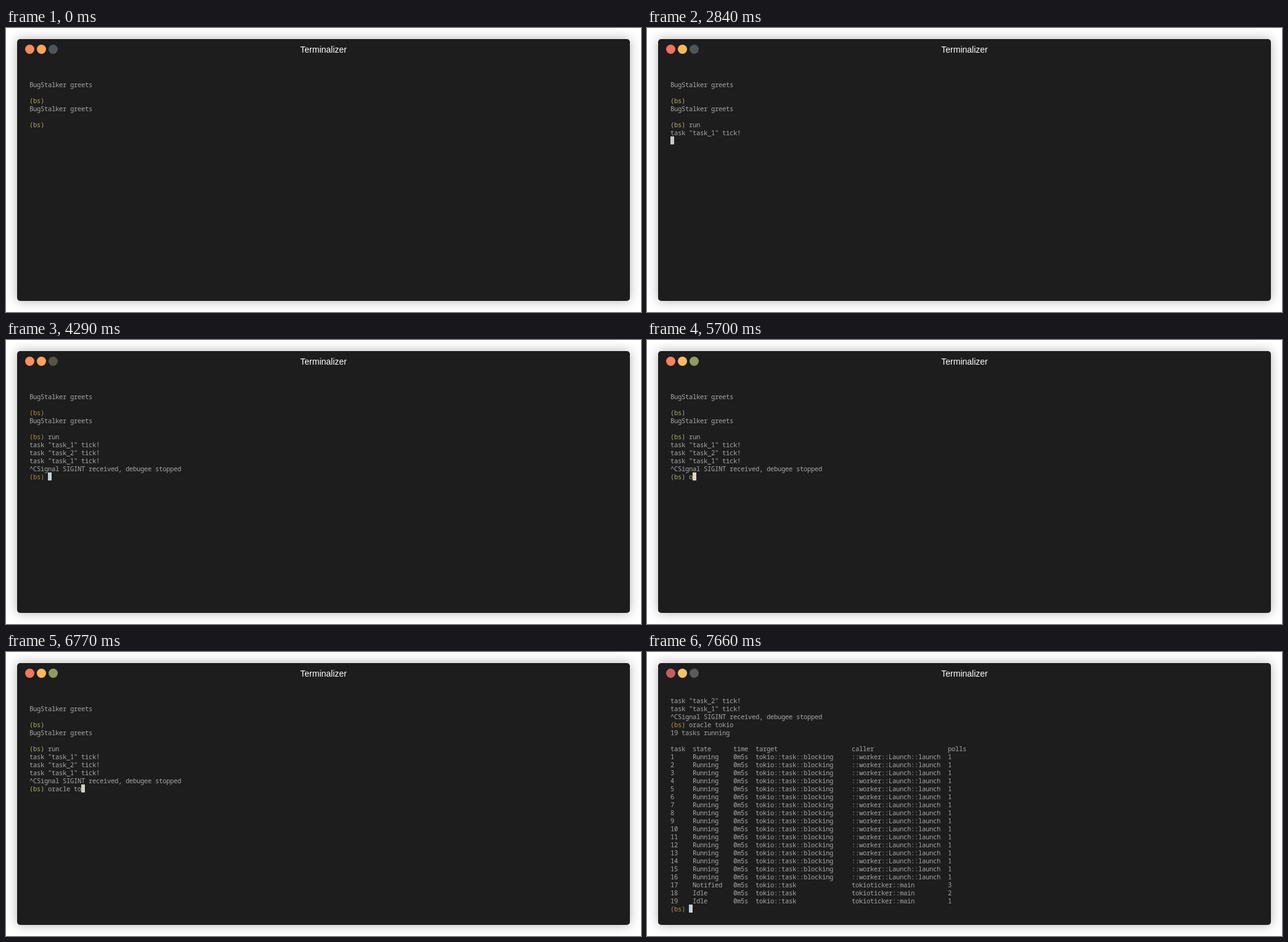
Write an HTML page that moves like this. It is 1030 px wide and 461 px high and loops after 8000 ms.

```html
<!DOCTYPE html>
<html lang="en">
<head>
<meta charset="utf-8">
<title>Terminal session</title>
<style>
  html, body { margin: 0; width: 100%; height: 100%; overflow: hidden; background: #fff; }
  #win {
    position: absolute; left: 18px; top: 18px; width: 994px; height: 425px;
    border-radius: 5px; background: #1d1d1d; box-shadow: 0 0 18px #b3b3b3;
  }
  .dot { position: absolute; top: 9px; width: 15px; height: 15px; border-radius: 50%; }
  .dot:nth-child(1) { left: 13px; background: var(--close); }
  .dot:nth-child(2) { left: 32px; background: var(--min); }
  .dot:nth-child(3) { left: 51px; background: var(--max); }
  #title {
    position: absolute; left: 0; right: 0; top: 9px; text-align: center; color: #fff;
    font: 14px/16px "Liberation Sans", Arial, sans-serif;
  }
  #screen {
    position: absolute; left: 20px; top: 55px; margin: 0; color: #a8a8a8;
    font: 10.5px/13px "Noto Sans Mono", "DejaVu Sans Mono", monospace;
    letter-spacing: -.3px; font-variant-ligatures: none; white-space: pre;
  }
  #screen b { font-weight: normal; color: var(--prompt); }
  #cursor { position: absolute; width: 6px; height: 13px; background: var(--cursor); }
</style>
</head>
<body>
<div id="win">
  <i class="dot"></i><i class="dot"></i><i class="dot"></i>
  <div id="title">Terminalizer</div>
  <pre id="screen"></pre>
  <div id="cursor"></div>
</div>
<script>
const LOOP = 8000, CELL_W = 6, CELL_H = 13, LEFT = 20, TOP = 54;
const PROMPT = '(bs) ';
const win = document.getElementById('win');
const screen = document.getElementById('screen');
const cursor = document.getElementById('cursor');

const tick = n => `task "task_${n}" tick!`;
const greeting = ['', 'BugStalker greets', '', PROMPT, 'BugStalker greets', ''];
const signal = '^CSignal SIGINT received, debugee stopped';
const ran = [...greeting, PROMPT + 'run'];
const ticked = [...ran, tick(1), tick(2), tick(1)];
const stopped = [...ticked, signal];

const row = (id, state, time, target, caller, polls) =>
  String(id).padEnd(6) + state.padEnd(11) + time.padEnd(6) +
  target.padEnd(26) + caller.padEnd(26) + polls;
const blocking = id => row(id, 'Running', '0m5s', 'tokio::task::blocking', '::worker::Launch::launch', 1);
const ticker = (id, state, polls) => row(id, state, '0m5s', 'tokio::task', 'tokioticker::main', polls);

const report = [
  tick(2), tick(1), signal, PROMPT + 'oracle tokio', '19 tasks running', '',
  row('task', 'state', 'time', 'target', 'caller', 'polls'),
  ...Array.from({ length: 16 }, (_, i) => blocking(i + 1)),
  ticker(17, 'Notified', 3), ticker(18, 'Idle', 2), ticker(19, 'Idle', 1),
  PROMPT
];

const steps = [];
const add = (at, lines) => steps.push({ at, lines });
const type = (base, keys) => keys.forEach(([at, text]) => add(at, [...base, PROMPT + text]));

type(greeting, [[0, ''], [1090, 'r'], [1185, 'ru'], [1280, 'run']]);
add(1680, [...ran, '']);
add(2840, [...ran, tick(1), '']);
add(3840, [...ticked, '']);
type(stopped, [
  [4290, ''], [5700, 'o'], [5820, 'or'], [5920, 'orac'], [6140, 'oracle'],
  [6510, 'oracle '], [6650, 'oracle t'], [6770, 'oracle to'],
  [7000, 'oracle tok'], [7180, 'oracle toki'], [7360, 'oracle tokio']
]);
add(7660, report);

const tones = ['close', 'min', 'max', 'prompt', 'cursor'];
const palettes = [
  [0, '#f68b5c', '#ffa558', '#4d565c', '#a9a860', '#c8c8c8'],
  [2840, '#f2715f', '#f8b858', '#4b555b', '#b3b36a', '#c8c8c8'],
  [4290, '#ff9161', '#ffa358', '#575346', '#a48f48', '#c8cdd0'],
  [5700, '#f8845f', '#ffb961', '#8f9b5f', '#a9b068', '#dcd8c4'],
  [6770, '#f27a5d', '#ffb860', '#909a64', '#a9b068', '#d0d0c6'],
  [7360, '#ff935b', '#ffa055', '#9da468', '#b9ba69', '#d9ddc8'],
  [7660, '#c65e5b', '#f5c26a', '#5a5a5a', '#b9934a', '#c5d3e2']
];

let shown = null;
function show(step) {
  const { at, lines } = step;
  screen.innerHTML = lines.map(s => s.replace(PROMPT, `<b>${PROMPT}</b>`)).join('\n');
  const last = lines.length - 1;
  cursor.style.left = LEFT + lines[last].length * CELL_W + 'px';
  cursor.style.top = TOP + last * CELL_H + 'px';
  cursor.hidden = at === 0;
  const colours = palettes.findLast(p => p[0] <= at);
  tones.forEach((name, i) => win.style.setProperty('--' + name, colours[i + 1]));
  shown = step;
}

const start = performance.now();
function draw(now) {
  const t = Math.max(0, now - start) % LOOP;
  const step = steps.findLast(s => s.at <= t);
  if (step !== shown) show(step);
  requestAnimationFrame(draw);
}
draw(start);
</script>
</body>
</html>
```
